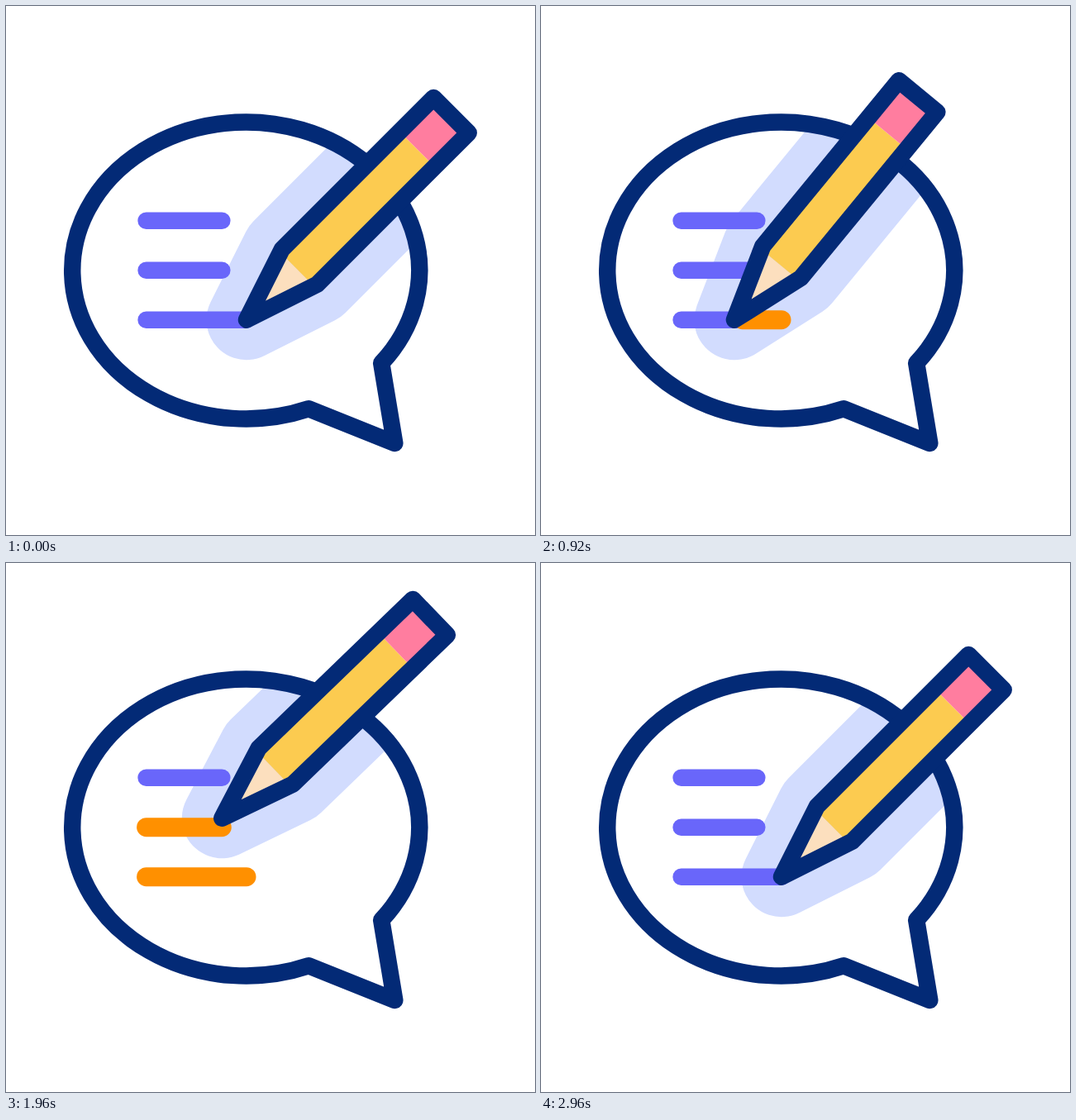
These frames come from a looping animation (640 px wide and 640 px high, 3000 ms). An HTML page:

```html
<!DOCTYPE html>
<html lang="en">
<head>
<meta charset="utf-8">
<title>Writing pencil</title>
<style>
  html, body { margin: 0; width: 100%; height: 100%; overflow: hidden; background: #fff; }
  svg { display: block; width: 100vw; height: 100vh; }
  path { stroke-linecap: round; stroke-linejoin: round; }
  .ink { fill: none; stroke: #032a76; stroke-width: 20.5; }
  .line { stroke: #6966fa; stroke-width: 20.5; }
  .mark { stroke: #ff9000; stroke-width: 23; }
  .shadow { fill: #d2dcfe; stroke: #d2dcfe; stroke-width: 97; }
</style>
</head>
<body>
<svg viewBox="0 0 640 640">
  <defs>
    <path id="bubble" d="M366.2 487.3A210 179.5 0 1 1 454.2 432.1L470.3 529Z"/>
    <path id="body" d="M0 0L90.5 -30H350V30H90.5Z"/>
    <clipPath id="inside"><use href="#bubble" class="swing"/></clipPath>
  </defs>
  <g clip-path="url(#inside)"><use href="#body" class="pencil shadow"/></g>
  <g class="swing">
    <g id="lines"></g>
    <use href="#bubble" class="ink"/>
  </g>
  <g id="marks"></g>
  <g class="pencil">
    <path fill="#fcdfbe" d="M0 0L86.5 -30V30Z"/>
    <path fill="#fccb50" d="M86.5 -30H292V30H86.5Z"/>
    <path fill="#ff7d9f" d="M292 -30H350V30H292Z"/>
    <use href="#body" class="ink"/>
  </g>
</svg>
<script>
const LOOP = 3000;
const LEFT = 169.6, SHORT = 261.3, LONG = 291, BOTTOM = 379.7, GAP = 60;

const all = selector => [...document.querySelectorAll(selector)];
const place = (nodes, transform) =>
  nodes.forEach(node => node.setAttribute('transform', transform));
const segment = (from, to, row) => `M${from} ${BOTTOM - row * GAP}H${to}`;

// adds one path per row, counted from the bottom
function addRows(id, className) {
  const group = document.getElementById(id);
  return [0, 1, 2].map(row => {
    const path = document.createElementNS('http://www.w3.org/2000/svg', 'path');
    path.setAttribute('class', className);
    if (className === 'line') path.setAttribute('d', segment(LEFT, row ? SHORT : LONG, row));
    return group.appendChild(path);
  });
}

addRows('lines', 'line');
const marks = addRows('marks', 'mark');
const markGroup = document.getElementById('marks');
const pencils = all('.pencil');
const swings = all('.swing');

function draw(t) {
  const ramp = (start, end) => Math.min(1, Math.max(0, (t - start) / (end - start)));

  const aside = ramp(100, 470) - ramp(655, 740);
  const lift = [ramp(1328, 1508), ramp(1928, 2108)];
  const write = [ramp(740, 1125), ramp(1508, 1764), ramp(2108, 2364)];
  const back = ramp(2610, 2960);

  const x = LONG + 85.5 * aside
    + (LONG - LEFT) * (back - write[0]) + (SHORT - LEFT) * (write[1] - write[2]);
  const y = BOTTOM + GAP * (2 * back - lift[0] - lift[1]);
  const lean = 45 + 15 * ramp(100, 470) - 5.6 * ramp(655, 740) - 8.1 * write[0]
    - 12.5 * lift[1] - 0.9 * write[2] + 12.1 * back;
  const swing = -15 * ramp(100, 280) + 22 * ramp(280, 465) - 7 * ramp(465, 650);

  place(pencils, `translate(${x} ${y}) rotate(${-lean})`);
  place(swings, `rotate(${swing} 470.3 529)`);

  // each mark trails the tip slightly, then catches up; the middle one runs rightwards
  marks.forEach((mark, row) => {
    const right = row ? SHORT : LONG;
    const [from, to] = row === 1 ? [LEFT, right] : [right, LEFT];
    const end = from + (to - from) * write[row] ** 1.25;
    mark.setAttribute('d', write[row] ? segment(from, end, row) : '');
  });
  markGroup.setAttribute('opacity', 1 - back);
}

function tick() {
  draw(performance.now() % LOOP);
  requestAnimationFrame(tick);
}
tick();
</script>
</body>
</html>
```
